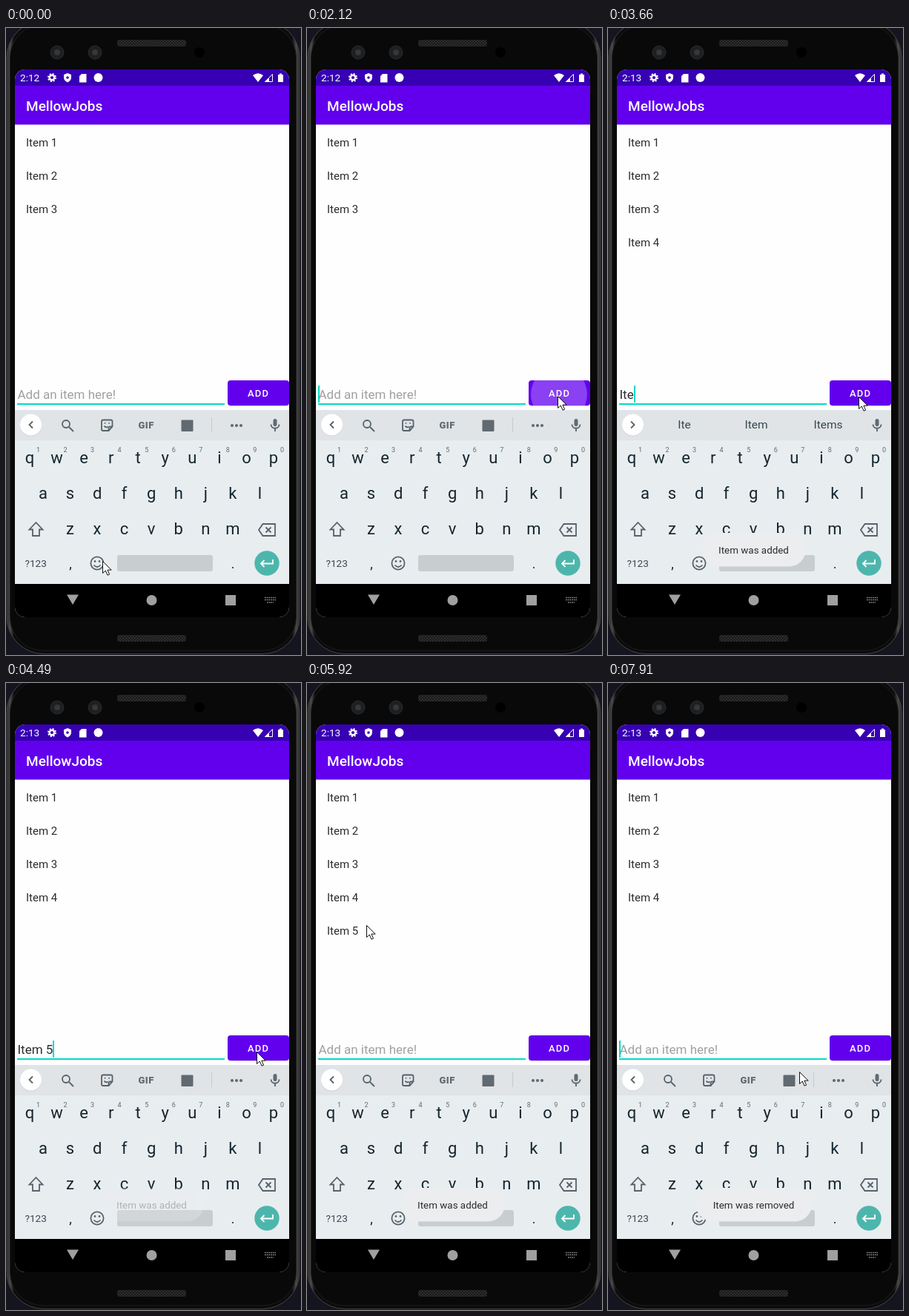
An HTML page that plays this animation: 398 px wide and 847 px high, repeating every 8 s.

```html
<!DOCTYPE html>
<html lang="en">
<head>
<meta charset="utf-8">
<title>To-do list demo</title>
<style>
  html, body { margin: 0; width: 100%; height: 100%; overflow: hidden; background: #15151f; }
  svg { display: block; width: 398px; height: 847px; font-family: Roboto, "Open Sans", sans-serif; }
  text { white-space: pre; }
  .mid { text-anchor: middle; }
  .line { fill: none; stroke: #56626a; stroke-width: 1.8; }
  .soft { fill: #606a70; }
  .keys { font-size: 22px; fill: #14262e; }
</style>
</head>
<body>
<svg viewBox="0 0 398 847">
  <defs>
    <linearGradient id="rim">
      <stop offset="0" stop-color="#2a2a2a"/><stop offset=".012" stop-color="#4a4a4a"/>
      <stop offset=".025" stop-color="#0c0c0c"/><stop offset=".975" stop-color="#0c0c0c"/>
      <stop offset=".988" stop-color="#4a4a4a"/><stop offset="1" stop-color="#2a2a2a"/>
    </linearGradient>
    <pattern id="mesh" width="4" height="4" patternUnits="userSpaceOnUse">
      <rect width="4" height="4" fill="#2d2d2d"/><path d="M0 0l4 4M4 0l-4 4" stroke="#1b1b1b"/>
    </pattern>
    <clipPath id="screen"><rect x="12" y="56" width="370" height="740" rx="14"/></clipPath>
    <clipPath id="button"><rect x="299" y="476" width="83" height="34" rx="4"/></clipPath>
  </defs>

  <!-- phone -->
  <rect x="1" y="-10" width="395" height="855.500" rx="50" fill="url(#rim)" stroke="#444"/>
  <rect x="5.500" y="-5" width="386" height="846" rx="45" fill="#090909" stroke="#1c1c1c"/>
  <rect x="150" y="16" width="93" height="9" rx="3" fill="url(#mesh)"/>
  <rect x="150" y="820" width="93" height="9" rx="3" fill="url(#mesh)"/>
  <g fill="#1d1f21" stroke="#2a2c2e">
    <circle cx="69" cy="33" r="9"/><circle cx="120" cy="33" r="9"/>
    <circle cx="69" cy="33" r="4" fill="#36393c"/><circle cx="120" cy="33" r="4" fill="#36393c"/>
  </g>
  <circle cx="261" cy="33" r="7" fill="#000"/>

  <g clip-path="url(#screen)">
    <path fill="#fefefe" d="M12 56h370v740H12z"/>
    <path fill="#3700b3" d="M12 56h370v22H12z"/>
    <path fill="#6200ee" d="M12 78h370v52.500H12z"/>
    <path fill="#e0e4e7" d="M12 516h370v41H12z"/>
    <path fill="#e8edf0" d="M12 557h370v194H12z"/>
    <path d="M12 751h370v45H12z"/>

    <!-- status bar -->
    <g fill="#fff">
      <text id="clock" x="19" y="72" font-size="13.6"></text>
      <g fill="none" stroke="#fff">
        <circle cx="62" cy="67" r="3.3" stroke-width="2.4"/>
        <circle cx="62" cy="67" r="5" stroke-width="2" stroke-dasharray="2 1.93"/>
      </g>
      <path d="M83 61l5 2v4c0 3-2 5-5 6.500-3-1.500-5-3.500-5-6.500v-4z"/>
      <circle cx="83" cy="67" r="1.8" fill="#3700b3"/>
      <path d="M102 62h6.500v11.500h-9.500v-8.500z"/>
      <circle cx="124.500" cy="67" r="6"/>
      <path d="M333 64q7-5.500 14 0l-7 9zM355 67v6h-6zM367 63h2v-1.500h3v1.500h2v10h-7z"/>
      <path d="M359.500 62.500v10h-10z" fill="none" stroke="#fff"/>
      <text x="27" y="112" font-size="19" font-weight="500">MellowJobs</text>
    </g>

    <g id="items" font-size="15" fill="#2b2b2b"></g>

    <!-- input row -->
    <text id="field" x="15.500" y="501" font-size="17"></text>
    <path fill="#03dac5" d="M15 507h280v2H15z"/>
    <rect id="caret" y="483" width="2" height="23" fill="#03dac5"/>
    <rect x="299" y="477" width="83" height="34" rx="4" fill="#000" opacity=".13"/>
    <rect x="299" y="476" width="83" height="34" rx="4" fill="#6200ee"/>
    <g clip-path="url(#button)"><circle id="ripple" cx="340" cy="495" fill="#fff"/></g>
    <text x="326" y="498" font-size="13" font-weight="500" letter-spacing="1.200" fill="#fff">ADD</text>

    <!-- keyboard strip -->
    <circle cx="33.500" cy="537" r="14.500" fill="#cdd1d4"/>
    <circle cx="33.500" cy="536" r="14.500" fill="#fff"/>
    <path id="chevron" class="line" d="M36 531.500l-4.500 4.500 4.500 4.500"/>
    <g id="tools">
      <circle class="line" cx="81" cy="535" r="5"/><path class="line" d="M85 539l6 6"/>
      <path class="line" d="M131 529.500h10.500q2 0 2 2v7l-5 5.500h-7.500q-2 0-2-2v-10.500q0-2 2-2zM143.500 538.500h-3q-2 0-2 2v3.500"/>
      <path class="line" d="M132.500 537.500q2 3 5 1M133.500 533v1.500M139 533v1.500"/>
      <text x="178.500" y="541" font-size="13" font-weight="900" letter-spacing=".5" class="soft">GIF</text>
      <rect x="236.500" y="529.500" width="16" height="15.500" rx="1" class="soft"/>
      <path d="M277.500 526v20" stroke="#c5cacd"/>
      <g class="soft"><circle cx="305" cy="537" r="2.100"/><circle cx="311" cy="537" r="2.100"/><circle cx="317" cy="537" r="2.100"/></g>
    </g>
    <g id="words" class="mid" font-size="15.500" fill="#37474f"></g>
    <rect x="360.500" y="528" width="5" height="10" rx="2.500" class="soft"/>
    <path class="line" d="M357.500 535.500c0 7 11 7 11 0M363 541v4"/>

    <!-- keys -->
    <g id="keys" class="keys mid"></g>
    <g id="digits" class="mid soft" font-size="9"></g>
    <path id="shift" class="line" d="M40.500 668l9 9.500h-4.500v8.500h-9v-8.500h-4.500z"/>
    <path class="line" d="M346.500 670h16.500v16h-16.500l-5.500-8zM350.500 674.500l7 7M357.500 674.500l-7 7"/>
    <text x="25.500" y="728" font-size="13.600" fill="#37464d">?123</text>
    <g class="keys mid" style="font-size:18px"><text x="87" y="730">,</text><text x="306" y="730">.</text></g>
    <circle class="line" cx="123" cy="723" r="8.600"/>
    <path class="line" d="M118.500 725.500q4.500 5 9 0"/>
    <circle cx="120" cy="720.500" r="1.400" class="soft"/><circle cx="126" cy="720.500" r="1.400" class="soft"/>
    <rect x="150" y="712" width="129" height="22" rx="3" fill="#c8cdd0"/>
    <circle cx="352" cy="723" r="16.700" fill="#4db6ac"/>
    <path class="line" d="M360 718v5.500h-16M348.500 719l-4.500 4.500 4.500 4.500" style="stroke:#fff"/>

    <!-- navigation bar -->
    <g fill="#a0a0a0">
      <path d="M82 765.500h16l-8 13.500zM296 766h14v14h-14z"/>
      <circle cx="196.500" cy="773" r="7"/>
      <path d="M349 769.500h15M349 772.500h15M352 776h9" stroke="#8c8c8c" stroke-width="1.500" stroke-dasharray="1.700 1"/>
    </g>

    <g id="toast">
      <rect id="pill" y="682" height="45.500" rx="22.700" fill="#ecedee"/>
      <text id="note" class="mid" x="196.500" y="710" font-size="13.400" fill="#2b2b2b"></text>
    </g>
  </g>
  <path id="pointer" d="M0 0v16l3.800-3.500 2.700 6.200 2.600-1.100-2.700-6h5.300z" fill="#fff" stroke="#111" stroke-linejoin="round"/>
</svg>

<script>
const LOOP = 8000;
const el = id => document.getElementById(id);

// Bursts of screen updates: first, last, count
const bursts = [
  [300, 840, 5], [1140, 1840, 6], [2120, 2660, 5], [3060, 3920, 6],
  [4210, 5190, 8], [5330, 6320, 8], [6470, 6470, 1], [6900, 7910, 8]
];
const path = [ // time, x, y
  [0, 130, 720], [1140, 130, 720], [1280, 386, 771], [1420, 335, 680], [1560, 350, 590],
  [1700, 340, 507], [1840, 338, 497], [2660, 338, 498], [5190, 338, 498], [5330, 306, 477],
  [5890, 80, 327], [7180, 80, 328], [7910, 258, 525]
];
const caretFlips = [300, 3060, 3200, 5890, 6470, 6900, 7470];
const guesses = {
  I: ["I'm", "I", "I'll"], It: ["It's", "It", "Its"],
  Ite: ["Ite", "Item", "Items"], Item: ["Item's", "Item", "Items"]
};

const clamp = v => Math.max(0, Math.min(1, v));
const ramp = (t, a, b) => clamp((t - a) / (b - a));
const between = (t, a, b) => t >= a && t < b;

function snap(t) {
  let at = 0;
  for (const [first, last, count] of bursts) {
    if (t < first) break;
    const gap = (last - first) / (count - 1) || 1;
    at = first + gap * Math.min(count - 1, Math.floor((t - first) / gap + 0.1));
  }
  return at;
}

function along(t) {
  const i = path.findIndex(p => p[0] > t);
  if (i < 0) return path[path.length - 1].slice(1);
  const [a, b] = [path[i - 1], path[i]], k = ramp(t, a[0], b[0]);
  return [1, 2].map(n => a[n] + (b[n] - a[n]) * k);
}

function typed(t) {
  const write = (start, gap) => "Item ".slice(0, Math.floor((t - start) / gap + 0.05) + 1);
  if (between(t, 300, 1140)) return write(300, 135);
  if (between(t, 1140, 2120)) return "Item 4";
  if (between(t, 3200, 4210)) return write(3232, 172);
  if (between(t, 4210, 4770)) return "Item 5";
  return "";
}

function addText(parent, x, y, content) {
  const node = document.createElementNS("http://www.w3.org/2000/svg", "text");
  node.setAttribute("x", x);
  node.setAttribute("y", y);
  node.textContent = content;
  el(parent).append(node);
  return node;
}

const set = (id, attrs) => {
  for (const name in attrs) el(id).setAttribute(name, attrs[name]);
};
const show = (node, on) => { node.style.display = on ? "" : "none"; };

const items = [1, 2, 3, 4, 5].map(n => addText("items", 27, 114.3 + n * 45.2, "Item " + n));
const words = [103, 200, 297].map(x => addText("words", x, 541, ""));
const keys = [];
[["qwertyuiop", 32, 588], ["asdfghjkl", 50, 636], ["zxcvbnm", 86.5, 684]].forEach(([row, x, y]) =>
  [...row].forEach((c, i) => keys.push({ c, y, node: addText("keys", x + i * 36.55, y, c) })));
[..."1234567890"].forEach((d, i) => addText("digits", 43.5 + i * 36.55, 573, d));

function draw(time) {
  const t = snap(time);
  el("clock").textContent = t < 2500 ? "2:12" : "2:13";
  show(items[3], t >= 2250);
  show(items[4], between(t, 4900, 6900));

  const text = typed(t), field = el("field");
  field.textContent = text;
  const width = text ? field.getComputedTextLength() : 0;
  set("caret", { x: Math.round(15.4 + width) });
  show(el("caret"), caretFlips.filter(f => t >= f).length % 2);
  if (!text) field.textContent = "Add an item here!";
  set("field", { fill: text ? "#2b2b2b" : "#a0a0a0" });

  const picks = guesses[text.trim()];
  show(el("tools"), !picks);
  words.forEach((w, i) => { w.textContent = picks ? picks[i] : ""; });
  set("chevron", { transform: picks ? "rotate(180 33.5 536)" : "" });

  const press = t < 4770 ? 2120 : 4770, age = t - press;
  set("ripple", { r: 38 + Math.max(0, age) * 0.15, opacity: age < 0 ? 0 : 0.25 * (1 - ramp(age, 0, 500)) });

  const caps = between(t, 2250, 3200);
  keys.forEach(k => {
    k.node.textContent = caps ? k.c.toUpperCase() : k.c;
    k.node.setAttribute("y", k.y + (caps ? 2.5 : 0));
  });
  el("shift").style.fill = caps ? "#4c575d" : "none";

  const removed = t >= 7250;
  const alpha = removed ? ramp(t, 7250, 7600)
    : t < 4800 ? ramp(t, 2200, 2500) * (1 - ramp(t, 4290, 4575))
    : ramp(t, 4950, 5300) * (1 - ramp(t, 6900, 7180));
  const half = removed ? 78 : 70;
  set("pill", { x: 196.8 - half, width: half * 2 });
  set("toast", { opacity: alpha });
  el("note").textContent = removed ? "Item was removed" : "Item was added";

  set("pointer", { transform: `translate(${along(t).map(v => Math.round(v) + 0.5)})` });
}

function tick() {
  draw(performance.now() % LOOP);
  requestAnimationFrame(tick);
}
tick();
</script>
</body>
</html>
```
